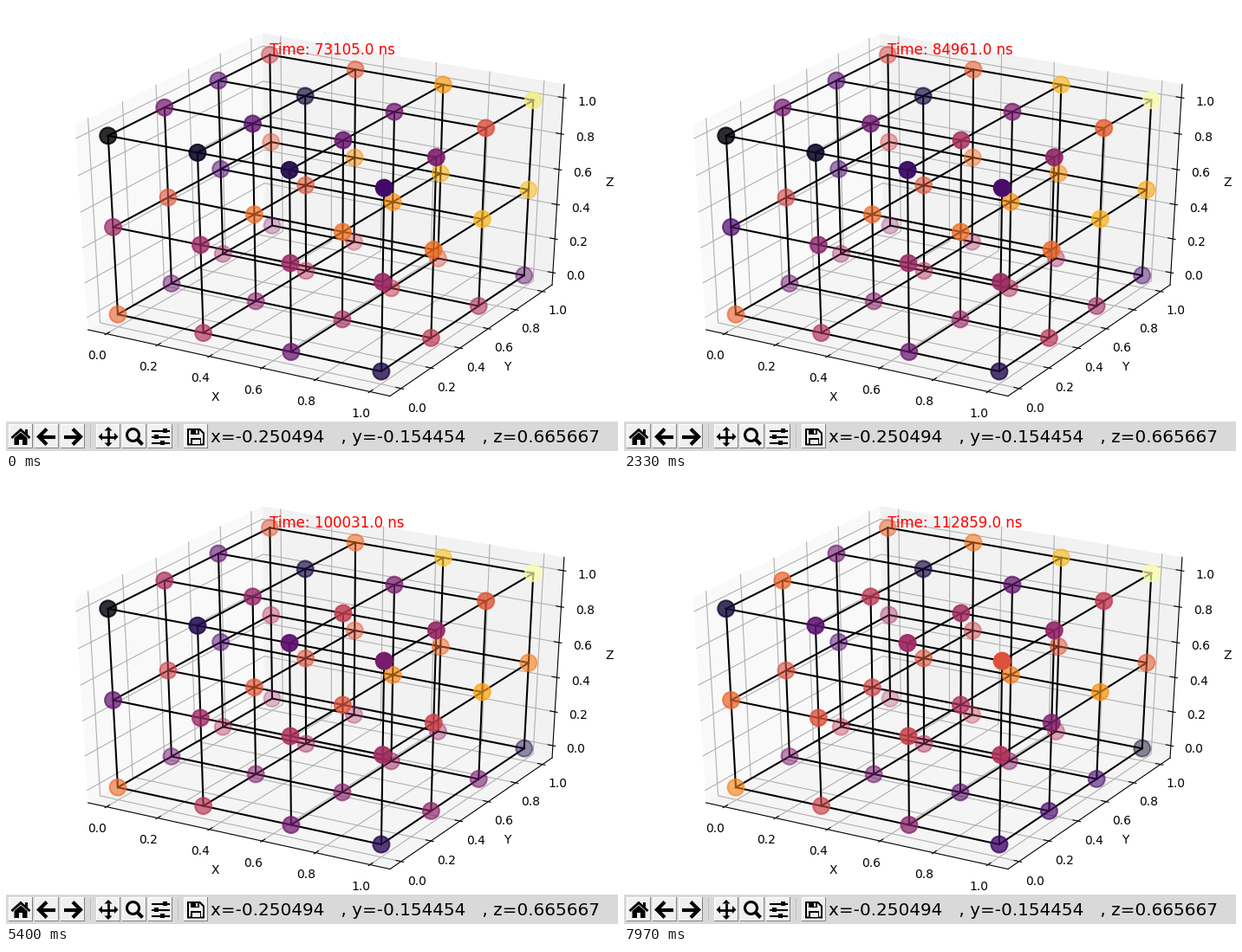
Animation of 706 by 514 pixels, one loop 8 s. Source, as a matplotlib script:

```python
import numpy as np
import matplotlib.pyplot as plt
from matplotlib.animation import FuncAnimation
from matplotlib.collections import LineCollection
from matplotlib.patches import Circle, Polygon, Rectangle

W, H, DPI = 706, 514, 100
FRAMES, LOOP = 240, 8000
VIEW_W, VIEW_H = 714, 480            # plot area, slightly cut off at the right
ELEV, AZIM, DIST = np.radians(30), np.radians(-60), 10
MARGIN, SPAN = .05, 1.1              # axis limits around the unit box
STEP = SPAN / 12
LO, HI = -MARGIN - STEP / 4, 1 + MARGIN + STEP / 4
TICKS = np.linspace(0, 1, 6)
FACE, TRAY = "#f0f0f0", "#d9d9d9"

plt.rcParams["font.family"] = "DejaVu Sans"

# Camera axes
TOWARD = np.array([np.cos(ELEV) * np.cos(AZIM), np.cos(ELEV) * np.sin(AZIM), np.sin(ELEV)])
RIGHT = np.array([-np.sin(AZIM), np.cos(AZIM), 0])
UP = np.cross(TOWARD, RIGHT)

# Heat at the two ends of each row of nodes, (left, right) for start and end
# of the loop; rows go from front to back, layers from top to bottom.
ROWS = np.array([
    [[(0, .2), (.1, .6)], [(.32, .35), (.66, .4)],
     [(.27, .6), (.33, .53)], [(.55, .95), (.65, 1)]],
    [[(.42, .42), (.65, .48)], [(.6, .68), (.58, .35)],
     [(.2, .82), (.22, .75)], [(.6, .85), (.42, .62)]],
    [[(.65, .12), (.72, .2)], [(.3, .5), (.35, .22)],
     [(.42, .45), (.5, .2)], [(.35, .25), (.45, .05)]],
])

# Local hot and cold spots: position, steady strength, mid-loop pulse
SPOTS = [
    ((.45, .67, 1), -.35, 0),
    ((.45, .67, .5), .25, 0),
    ((.55, 1, 0), .35, -.15),
    ((0, 0, .5), 0, -.25),
    ((1, 1, 1), 0, .2),
    ((.67, .33, 1), 0, .2),
]

CLOCK_MS = np.array([0, 1370, 2330, 3630, 5400, 6570, 7970])
CLOCK = [73105, 80171, 84961, 91373, 100031, 105911, 112859]


def camera(point):
    """Offset from the box centre and distance from the eye."""
    q = (np.asarray(point) + MARGIN) / SPAN - .5
    return q, DIST - TOWARD @ q


def project(*point):
    q, d = camera(point)
    u = (RIGHT @ q / d * DIST + .95) / 1.85
    v = (.9 - UP @ q / d * DIST) / 1.85
    return u * VIEW_W, v * VIEW_H


def path(*points):
    return [project(*p) for p in points]


fig = plt.figure(figsize=(W / DPI, H / DPI), dpi=DPI, facecolor="white")
ax = fig.add_axes([0, 0, 1, 1])
ax.set_xlim(0, W)
ax.set_ylim(H, 0)
ax.axis("off")


def lines(segments, color, width, z):
    ax.add_collection(LineCollection(segments, colors=color, linewidths=width,
                                     zorder=z, capstyle="projecting"))


def label(point, text, va):
    ax.text(*project(*point), text, size=10, ha="center", va=va)


def draw_box():
    panes = [
        ("#f9f9f9", [(LO, LO, LO), (LO, HI, LO), (LO, HI, HI), (LO, LO, HI)]),
        ("#f2f2f2", [(LO, HI, LO), (HI, HI, LO), (HI, HI, HI), (LO, HI, HI)]),
        ("#f5f5f5", [(LO, LO, LO), (HI, LO, LO), (HI, HI, LO), (LO, HI, LO)]),
    ]
    for color, corners in panes:
        ax.add_patch(Polygon(path(*corners), fc=color, ec="none", zorder=1))

    # distances outward from the box, scaled to the size of the plot in points
    per_point = 48 / (72 * (VIEW_W + VIEW_H) / DPI) * STEP
    pad, far_pad = 11.5 * per_point, 25 * per_point
    out, into = .1 * STEP, .2 * STEP

    grid, marks = [], []
    for t in TICKS:
        grid += [path((t, LO, LO), (t, HI, LO), (t, HI, HI)),
                 path((HI, t, LO), (LO, t, LO), (LO, t, HI)),
                 path((LO, LO, t), (LO, HI, t), (HI, HI, t))]
        marks += [path((t, LO - out, LO), (t, LO + into, LO)),
                  path((HI + out, t, LO), (HI - into, t, LO)),
                  path((HI + out, HI, t), (HI - into, HI, t))]
        for p in ((t, LO - pad, LO - pad), (HI + pad, t, LO - pad),
                  (HI + pad, HI + pad, t)):
            label(p, f"{t:.1f}", "top")
    axes = [path((LO, LO, LO), (HI, LO, LO)),
            path((HI, LO, LO), (HI, HI, LO)),
            path((HI, HI, LO), (HI, HI, HI))]
    lines(grid, "#b0b0b0", .8, 2)
    lines(axes + marks, "black", .8, 3)
    label((.5, LO - far_pad, LO - far_pad), "X", "center")
    label((HI + far_pad, .5, LO - far_pad), "Y", "center")
    label((HI + far_pad, HI + far_pad, .5), "Z", "center")


def draw_lattice():
    thirds, halves = np.linspace(0, 1, 4), (0, .5, 1)
    bars = []
    for a in thirds:
        for z in halves:
            bars += [path((0, a, z), (1, a, z)), path((a, 0, z), (a, 1, z))]
        for b in thirds:
            bars.append(path((a, b, 0), (a, b, 1)))
    lines(bars, "black", 1.5, 4)


def stroke(points, width=2.4):
    xs, ys = zip(*points)
    ax.plot(xs, ys, color="black", lw=width, zorder=8,
            solid_capstyle="butt", solid_joinstyle="miter")


def fill(points, color="black"):
    ax.add_patch(Polygon(points, fc=color, ec="none", zorder=8))


def block(x, y, w, h, color="black", z=9):
    ax.add_patch(Rectangle((x, y), w, h, fc=color, ec="none", zorder=z))


def button(x):
    block(x, 483, 28, 28, "#828282", 7)
    block(x, 483, 27, 27, "white", 7)
    block(x + 1, 484, 26, 26, FACE, 7)


def draw_toolbar():
    block(0, VIEW_H, W, H - VIEW_H, TRAY, 6)
    for x in (3, 33, 63, 104, 134, 164, 205):
        button(x)
    for x in (97, 198):
        block(x, 484, 1, 26, "#c0c0c0")

    # home
    stroke([(6.5, 499), (17, 489.5), (27.5, 499)], 2)
    fill([(17, 492.5), (24.5, 499), (24.5, 507), (9.5, 507), (9.5, 499)])
    block(22, 488.5, 3, 6)
    block(15, 501, 4, 6, FACE)

    # back and forward
    for cx, s in ((47, -1), (77, 1)):
        stroke([(cx, 488.5), (cx + 9 * s, 497.5), (cx, 506.5)], 3)
        stroke([(cx - 10 * s, 497.5), (cx + 8 * s, 497.5)], 3)

    # pan
    cx, cy = 118, 497.5
    stroke([(cx - 8, cy), (cx + 8, cy)], 2)
    stroke([(cx, cy - 8), (cx, cy + 8)], 2)
    for ux, uy in ((1, 0), (-1, 0), (0, 1), (0, -1)):
        fill([(cx + 11.5 * ux, cy + 11.5 * uy),
              (cx + 7 * ux + 4.5 * uy, cy + 7 * uy + 4.5 * ux),
              (cx + 7 * ux - 4.5 * uy, cy + 7 * uy - 4.5 * ux)])

    # zoom
    ax.add_patch(Circle((146.5, 495.5), 7, fc="none", ec="black", lw=2.2, zorder=8))
    stroke([(151.5, 500.5), (157.5, 506.5)], 3)

    # sliders
    for y, knob in ((490.5, 181), (497.5, 171), (504.5, 178)):
        stroke([(167.5, y), (188.5, y)], 1.5)
        block(knob, y - 2.5, 5, 5)

    # save
    fill([(209, 488), (224, 488), (229, 493), (229, 507.5), (209, 507.5)])
    fill([(211, 490), (223, 490), (227, 494), (227, 505.5), (211, 505.5)], FACE)
    block(213, 489, 10, 6)
    block(218.5, 490, 2.5, 4, FACE)
    block(213, 499, 12, 7)
    block(214.5, 500.5, 9, 5, FACE)

    ax.text(236, 504, "x=-0.250494   , y=-0.154454   , z=0.665667",
            size=14.4, va="baseline", zorder=9)


draw_box()
draw_lattice()
draw_toolbar()

# Nodes are painted from back to front and fade with distance.
spots = np.array([(x / 3, y / 3, z) for z in (1, .5, 0)
                  for y in range(4) for x in range(4)])
far = np.array([camera(p)[1] for p in spots])
spots, far = spots[np.argsort(-far)], np.sort(far)[::-1]
alpha = 1 - .7 * (far - far.min()) / np.ptp(far)
centres = np.array([project(*p) for p in spots])
nodes = ax.scatter(centres[:, 0], centres[:, 1], s=185, lw=1.5, zorder=5)
clock = ax.text(304, 56, "", size=12, color="red", va="baseline", zorder=10)

X, Y, Z = spots.T
ends = ROWS[np.rint(2 - 2 * Z).astype(int), np.rint(3 * Y).astype(int)]
START, END = (ends[:, k, 0] * (1 - X) + ends[:, k, 1] * X for k in (0, 1))


def heat(u):
    """Each row drifts from start to end, the front ones later than the back."""
    value = START + (END - START) * u ** (1 + 2 * (1 - Y))
    for place, steady, pulse in SPOTS:
        reach = np.exp(-((spots - place) ** 2).sum(axis=1) / .08)
        value += reach * (steady + pulse * np.sin(np.pi * u))
    return np.clip(value, 0, 1)


def update(frame):
    colors = plt.cm.inferno(heat(frame / (FRAMES - 1)))
    colors[:, 3] = alpha
    nodes.set_facecolor(colors)
    nodes.set_edgecolor(colors)
    now = np.interp(frame, CLOCK_MS * FRAMES // LOOP, CLOCK)
    clock.set_text(f"Time: {2 * round((now - 1) / 2) + 1:.1f} ns")
    return nodes, clock


anim = FuncAnimation(fig, update, frames=FRAMES, interval=LOOP / FRAMES,
                     repeat=True, repeat_delay=0)
plt.show()
```
